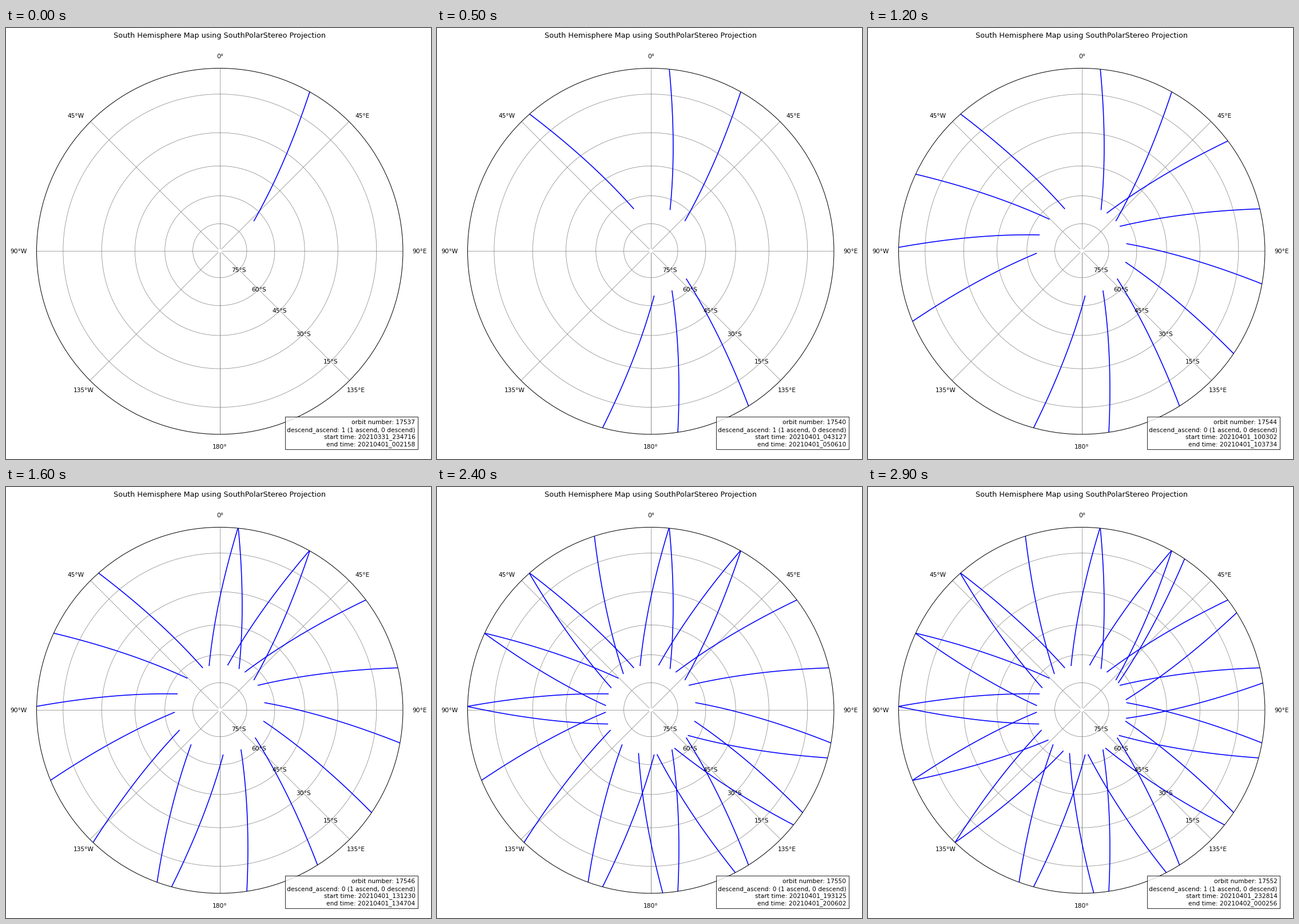
Animation of 743x754 px, one loop 3 s. Source, as a matplotlib script:

```python
import numpy as np
import matplotlib.pyplot as plt
from matplotlib.animation import FuncAnimation
from matplotlib.patches import Circle, Rectangle

W, H, DPI = 743, 754, 64
PT = 72 / DPI                      # points per pixel
POLE = (373.8, 389.6)
RIM = (373.7, 390.6, 320.2)        # centre x, centre y, radius
SCALE = 356.4                      # equator radius in pixels
LABEL, TITLE = 10.65 * PT, 12.77 * PT

# Sun-synchronous orbit
TILT = np.radians(7.4)             # inclination beyond 90 degrees
DRIFT = 23.683                     # westward shift per orbit, degrees
PERIOD = 5683.8
FIRST = 17537
MISSING = {(17537, 0), (17539, 1)}
PASSES = [(n, a) for n in range(FIRST, 17553) for a in (0, 1)
          if (n, a) not in MISSING]

# Logged ascending starts (seconds after midnight) and pass lengths
UP_ORBITS = [17537, 17540, 17542, 17548, 17552]
UP_STARTS = [-764, 16287, 27654, 61757, 84494]
UP_LENGTHS = [2082, 2083, 2085, 2085, 2082]

plt.rcParams["font.family"] = "DejaVu Sans"
fig = plt.figure(figsize=(W / DPI, H / DPI), dpi=DPI, facecolor="white")
ax = fig.add_axes([0, 0, 1, 1])
ax.set_xlim(0, W)
ax.set_ylim(H, 0)
ax.axis("off")


def project(lat, lon):
    """South polar stereographic position in pixels, from degrees."""
    conformal = -lat - 0.1922 * np.sin(np.radians(-2 * lat))
    r = SCALE * np.tan(np.radians(90 - conformal) / 2)
    lon = np.radians(lon)
    return POLE[0] + r * np.sin(lon), POLE[1] - r * np.cos(lon)


def label(x, y, text, size=LABEL, ha="center", shift=3.9):
    return ax.text(x, y + shift, text, fontsize=size, ha=ha,
                   va="baseline", color="black", zorder=6)


def track(orbit, ascending):
    """Ground track from 65 degrees south to the equator."""
    angle = np.radians(np.linspace(0, 66.05, 90))
    lat = -np.degrees(np.arcsin(np.cos(TILT) * np.sin(angle)))
    swing = np.degrees(np.arctan(np.sin(TILT) * np.tan(angle)))
    swing += np.degrees(angle) * DRIFT / 360
    if ascending:
        return project(lat, 28.25 - DRIFT * (orbit - FIRST) + swing)
    return project(lat, 30.62 - DRIFT * (orbit - 17545) - swing)


def stamp(seconds):
    day, rest = divmod(int(round(seconds)), 86400)
    date = {-1: "20210331", 0: "20210401", 1: "20210402"}[day]
    return f"{date}_{rest // 3600:02d}{rest // 60 % 60:02d}{rest % 60:02d}"


def times(orbit, ascending):
    if ascending:
        start = np.interp(orbit, UP_ORBITS, UP_STARTS)
        length = np.interp(orbit, UP_ORBITS, UP_LENGTHS)
    else:
        start = 47550 + (orbit - 17546) * PERIOD
        length = 2074 + (orbit - 17546) * 0.75
    return stamp(start), stamp(start + round(length))


# Map frame and graticule
rim = Circle(RIM[:2], RIM[2], fill=False, ec="black", lw=1.0 * PT, zorder=4)
ax.add_patch(rim)


def map_line(x, y, **style):
    line, = ax.plot(x, y, **style)
    line.set_clip_path(rim)
    return line


grid = dict(color="gray", lw=0.7 * PT, zorder=2)
for lon in range(-180, 181, 45):
    map_line(*project(np.array([-88.8, 0]), lon), **grid)
around = np.linspace(0, 360, 361)
for lat in range(-75, 0, 15):
    map_line(*project(lat, around), **grid)
    label(*project(lat, 135), f"{-lat}°S")

for x, y, text in [(374, 49, "0°"), (622.8, 153, "45°E"), (723, 390, "90°E"),
                   (612, 633, "135°E"), (374, 732, "180°"),
                   (135.5, 633, "135°W"), (22.5, 390, "90°W"),
                   (122, 153, "45°W")]:
    label(x, y, text)
label(374, 13, "South Hemisphere Map using SouthPolarStereo Projection",
      TITLE, shift=4.3)

# Information box
ax.add_patch(Rectangle((487.5, 680), 232.5, 56.5, fc="white", ec="black",
                       lw=1.07 * PT, alpha=0.8, zorder=5))
info = [label(715.5, 689 + 12.8 * i, "", ha="right") for i in range(4)]

tracks = [map_line(*track(n, a), color="blue", lw=1.6 * PT, zorder=3,
                   solid_capstyle="projecting") for n, a in PASSES]


def draw(frame):
    for i, line in enumerate(tracks):
        line.set_visible(i <= frame)
    orbit, ascending = PASSES[frame]
    start, end = times(orbit, ascending)
    rows = [f"orbit number: {orbit}",
            f"descend_ascend: {ascending} (1 ascend, 0 descend)",
            f"start time: {start}",
            f"end time: {end}"]
    for text, row in zip(info, rows):
        text.set_text(row)
    return tracks + info


anim = FuncAnimation(fig, draw, frames=len(PASSES), interval=100,
                     init_func=lambda: draw(0), repeat=True, repeat_delay=0)
plt.show()
```
